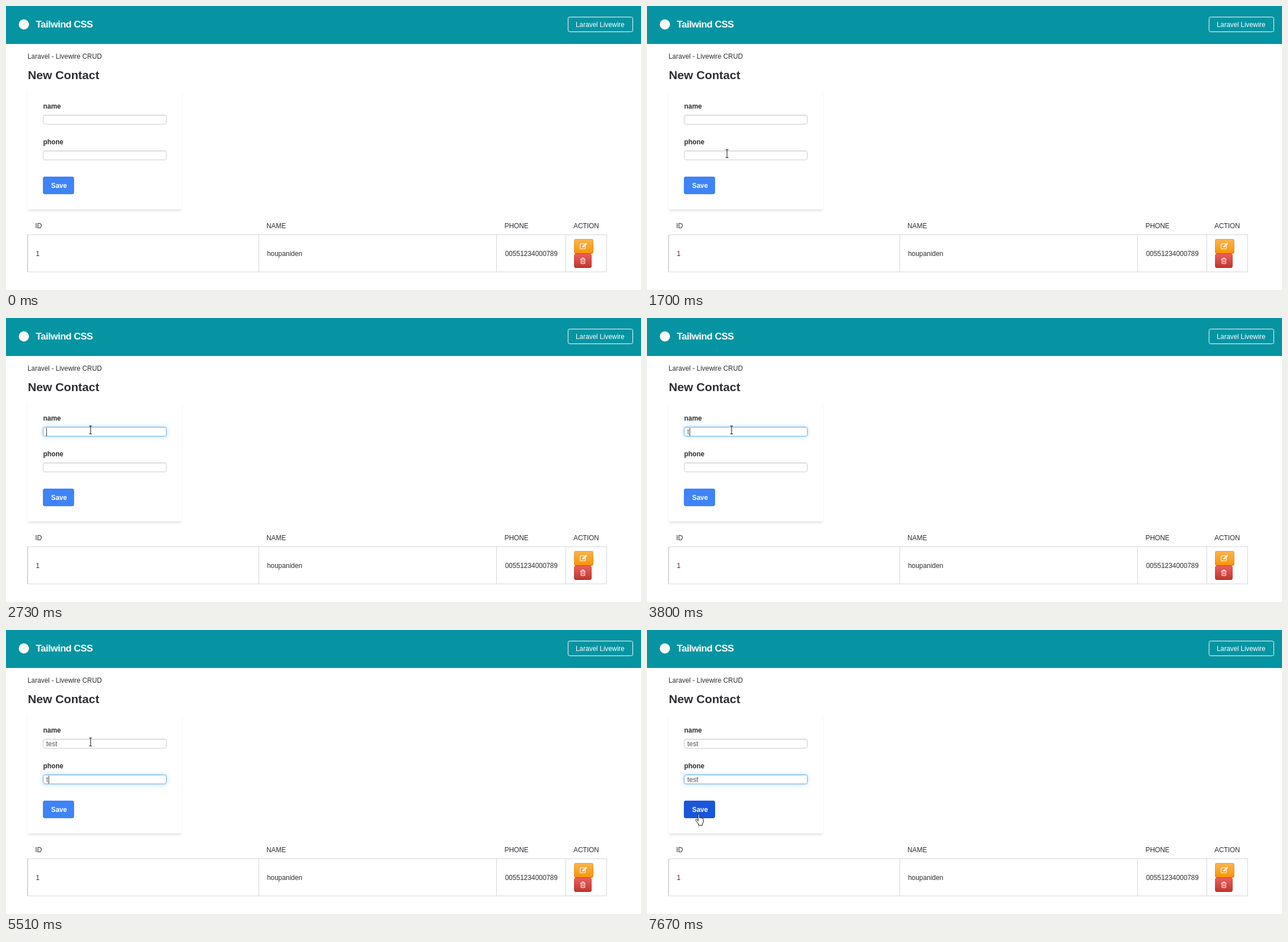
An HTML page for the animation above (8000 ms loop, 1119 px wide and 501 px high).

```html
<!DOCTYPE html>
<html lang="en">
<head>
<meta charset="utf-8">
<title>New Contact</title>
<style>
  html, body { margin: 0; width: 100%; height: 100%; overflow: hidden; background: #fff; }
  div, svg { position: absolute; box-sizing: border-box; }
  svg { left: 0; top: 0; }
  text { font: 11.9px "Liberation Sans", Arial, sans-serif; fill: #2d2e33; white-space: pre; }
  .bold { font-weight: 700; }
  .white { fill: #fff; }
  .brand { font-size: 17px; letter-spacing: -.5px; }
  .title { font-size: 20.8px; }
  .typed { font-size: 12px; fill: #555; }
  .bar { left: 0; top: 0; width: 1119px; height: 67px; background: #0694a2; }
  .link { left: 990px; top: 19px; width: 115px; height: 27px; border: 1px solid #fff; border-radius: 3.4px; }
  .card { left: 38px; top: 148px; width: 272px; height: 211px; border-radius: 3.4px;
    box-shadow: 0 3.4px 5px -1px rgba(0,0,0,.1), 0 1.7px 3.4px -1px rgba(0,0,0,.06); }
  .field { --glow: 0; left: 65px; width: 218px; height: 17px; border-radius: 3.4px;
    border: 1px solid color-mix(in srgb, #66afe9 calc(var(--glow) * 100%), #ccc);
    box-shadow: inset 0 1px 1px rgba(0,0,0,.075), 0 0 7px rgb(102 175 233 / calc(.5 * var(--glow))); }
  .save { left: 65px; top: 301px; width: 55px; height: 31px; border-radius: 3.4px; }
  .action { left: 1001px; border-radius: 3.4px; border: 1px solid rgba(0,0,0,.1); border-bottom-color: rgba(0,0,0,.25);
    background-origin: border-box; }
  .edit { top: 411px; width: 34px; height: 26px; background-image: linear-gradient(#fbb450, #f89406); }
  .trash { top: 437px; width: 31px; height: 25px; background-image: linear-gradient(#ee5f5b, #bd362f); }
</style>
</head>
<body>
<div class="bar"></div>
<div class="link"></div>
<div class="card"></div>
<div class="field" style="top:192px"></div>
<div class="field" style="top:255px"></div>
<div class="save"></div>
<div class="action edit"></div>
<div class="action trash"></div>

<svg width="1119" height="501">
  <circle cx="31.5" cy="32.5" r="9" fill="#fff"/>
  <text class="bold white brand" x="52.5" y="38">Tailwind CSS</text>
  <text class="white" x="1004" y="37">Laravel Livewire</text>
  <text x="38" y="93">Laravel - Livewire CRUD</text>
  <text class="bold title" x="38.4" y="129">New Contact</text>
  <text class="bold" x="65.5" y="181">name</text>
  <text class="bold" x="65.5" y="244">phone</text>
  <text class="bold white" x="79.5" y="321">Save</text>

  <g id="table">
    <rect x="38.5" y="403.5" width="1020" height="65.5" fill="none" stroke="#d4d6d9"/>
  </g>

  <g fill="none" stroke="#fff">
    <rect x="1011.7" y="419.5" width="9" height="9" rx="1.8" stroke-width="1.2"/>
    <path d="M1016 425.5l7-7" stroke-width="2.6"/>
    <path d="M1012 446.5h9M1015 446v-1.5h3.5v1.5M1013.3 447v7.5h6.6V447M1015.5 448.5v4M1017.8 448.5v4"/>
  </g>

  <text class="typed" x="71" y="205"></text>
  <text class="typed" x="71" y="268"></text>
  <rect id="caret" width="1" height="14" fill="#333"/>

  <g id="cursor" fill="#fff" stroke="#111" stroke-linejoin="round">
    <path id="arrow" d="M.5.5v14l3.3-3 2.2 5 2.2-1-2.2-5h4.6z"/>
    <path id="hand" transform="translate(-6 0)" d="M5 13V2a1.2 1.2 0 0 1 2.4 0V8a1.2 1.2 0 0 1 2.4 0 1.2 1.2 0 0 1 2.4 1 1 1 0 0 1 2 1v5l-1.5 3v2.5H5.5V18L1 12a1.4 1.4 0 0 1 2.4-1.6z"/>
    <path id="beam" fill="none" d="M-2.5-6.5h5M0-6.5v14M-2.5 7.5h5"/>
  </g>
</svg>

<script>
  const LOOP = 8000, BLINK = 500, FADE = 90;
  const byId = id => document.getElementById(id);
  const boxes = document.querySelectorAll('.field');
  const typed = document.querySelectorAll('.typed');
  const save = document.querySelector('.save');
  const caret = byId('caret'), cursor = byId('cursor');

  const columns = [
    { x: 51.5, head: 'ID', cell: '1', color: '#642020' },
    { x: 459, head: 'NAME', cell: 'houpaniden' },
    { x: 878.5, head: 'PHONE', cell: '00551234000789' },
    { x: 1000, head: 'ACTION', cell: '' }
  ];
  for (const { x, head, cell, color = '' } of columns) {
    byId('table').insertAdjacentHTML('beforeend', `
      <path d="M${Math.floor(x - 13) - .5} 403.5v65.5" stroke="#d4d6d9"/>
      <text x="${x}" y="392">${head}</text>
      <text x="${x + 1}" y="441" style="fill:${color}">${cell}</text>`);
  }

  const word = 'test';
  const fields = [
    { focus: 2640, typing: 3800, gap: 233 },
    { focus: 4900, typing: 5510, gap: 210 }
  ];

  // Each move starts where the one before it ended.
  const entry = { x: 899, y: 393 };
  const moves = [
    { from: 620, to: 780, x: 554, y: 293 },
    { from: 1090, to: 1240, x: 192, y: 240 },
    { from: 1340, to: 1560, x: 138, y: 297 },
    { from: 1560, to: 1870, x: 144, y: 215 },
    { from: 1950, to: 2240, x: 149, y: 197 },
    { from: 6600, to: 6670, x: 98, y: 295 },
    { from: 6670, to: 6830, x: 78, y: 330 },
    { from: 6980, to: 7140, x: 91, y: 324 }
  ];

  const show = (el, on) => el.style.display = on ? '' : 'none';
  const within = (v, a, b) => v >= a && v < b;
  const progress = (t, from, to) => Math.min(1, Math.max(0, (t - from) / (to - from)));

  function pointerAt(t) {
    let { x, y } = entry;
    for (const move of moves) {
      const p = progress(t, move.from, move.to);
      x += (move.x - x) * p;
      y += (move.y - y) * p;
    }
    return { x: Math.round(x), y: Math.round(y) };
  }

  function pointerShape(x, y) {
    if (!within(x, 65, 283)) return 'arrow';
    if (within(y, 192, 209) || within(y, 255, 272)) return 'beam';
    return within(y, 232, 255) ? 'hand' : 'arrow';
  }

  function drawForm(t) {
    const [nameGlow, phoneGlow] = fields.map(f => progress(t, f.focus - 10, f.focus + FADE - 20));
    boxes[0].style.setProperty('--glow', nameGlow * (1 - phoneGlow));
    boxes[1].style.setProperty('--glow', phoneGlow);

    const counts = fields.map(f => Math.min(word.length, Math.max(0, Math.floor((t - f.typing) / f.gap) + 1)));
    typed.forEach((el, i) => el.textContent = word.slice(0, counts[i]));

    const active = t < fields[1].focus ? 0 : 1;
    const { focus, typing, gap } = fields[active], count = counts[active];
    const lastInput = count ? typing + (count - 1) * gap : focus;
    caret.setAttribute('x', Math.ceil(71 + typed[active].getComputedTextLength()));
    caret.setAttribute('y', 194 + 63 * active);
    show(caret, t >= focus && (t - lastInput) % (2 * BLINK) < BLINK);
  }

  function drawPointer(t) {
    const { x, y } = pointerAt(t);
    const overSave = within(x, 65, 120) && within(y, 301, 332);
    const shape = overSave ? 'hand' : pointerShape(x, y);
    save.style.background = overSave ? '#1a56db' : '#3f83f8';
    cursor.setAttribute('transform', `translate(${x} ${y})`);
    show(cursor, t >= moves[0].from);
    for (const id of ['arrow', 'hand', 'beam']) show(byId(id), id === shape);
  }

  const start = performance.now();
  function frame() {
    const t = (performance.now() - start) % LOOP;
    drawForm(t);
    drawPointer(t);
    requestAnimationFrame(frame);
  }
  frame();
</script>
</body>
</html>
```
